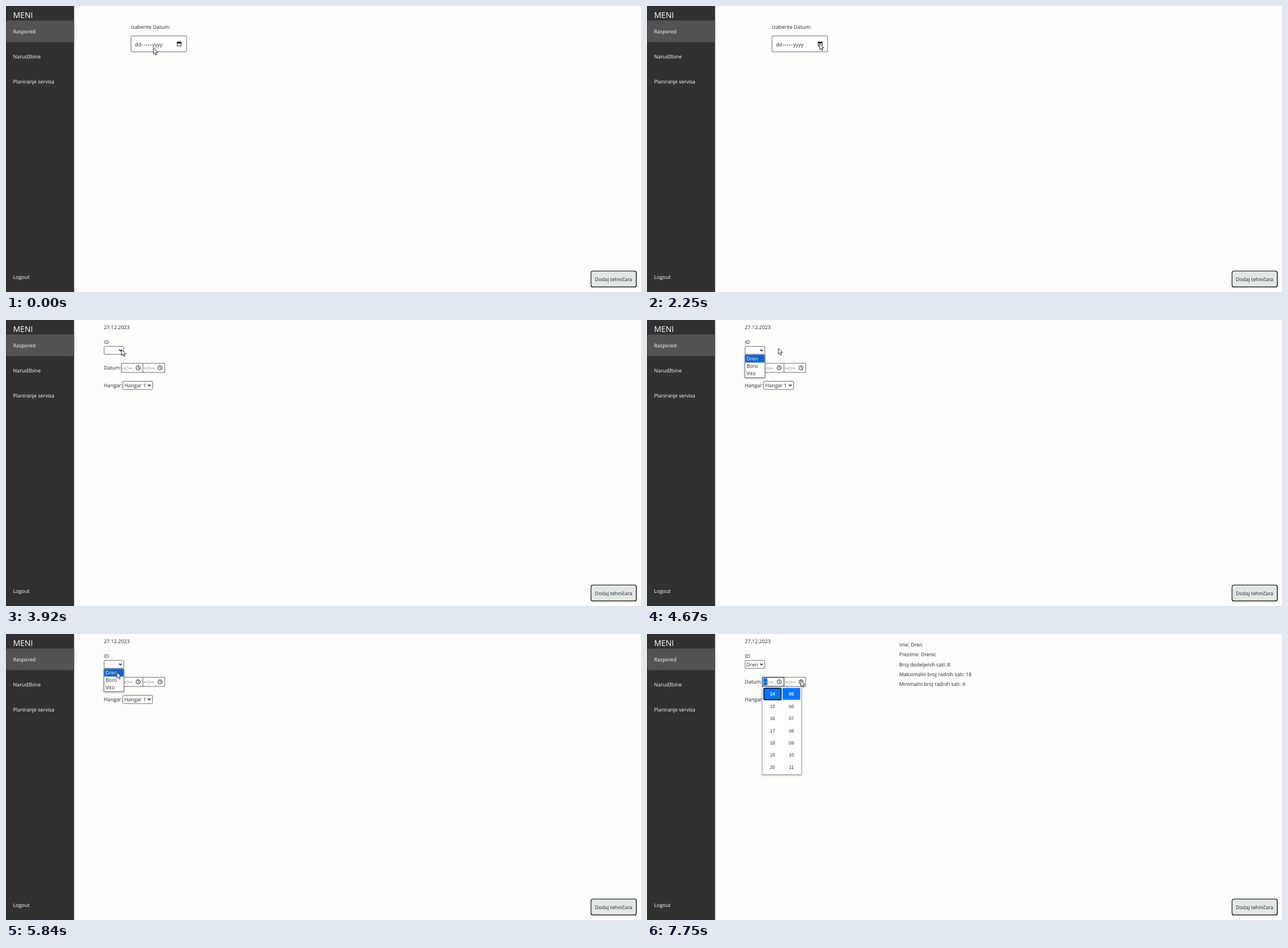
An HTML page for the animation above (8 s loop, 1115 by 502 pixels).

```html
<!DOCTYPE html>
<html lang="sr">
<head>
<meta charset="utf-8">
<title>Raspored</title>
<style>
html, body { margin: 0; width: 100%; height: 100%; overflow: hidden; background: #fdfdfc; }
svg { display: block; width: 1115px; height: 502px; }
text { font: 8.9px "Open Sans", "Noto Sans", sans-serif; fill: #262626; text-rendering: geometricPrecision; white-space: pre; }
.nav text { fill: #fff; }
.nav .title { font-size: 14px; }
.dash { letter-spacing: .85px; font-weight: 600; }
.pop text { font: 7.2px "Liberation Sans", Arial, sans-serif; fill: #111; }
.pop .mid { text-anchor: middle; }
.pop .bold { font-weight: bold; }
.pop .dim { fill: #767676; }
.pop .link { fill: #0f6fae; }
.pop .time { font-size: 8.3px; fill: #333; }
.pop .field { font: 8.9px "Open Sans", "Noto Sans", sans-serif; }
.pop .on, .on { fill: #fff; }
.box { fill: #fff; stroke: #6c6c6c; }
.panel { fill: #fff; stroke: #b4b4bc; filter: drop-shadow(0 1px 1.5px #0006); }
.blue { fill: #0075ff; }
.ring { stroke: #000; stroke-width: 1.5; }
.mark { fill: #0078d7; }
.line { fill: none; stroke: #222; }

/* every part shares one 8 s clock */
.a { animation: 8s step-end infinite; }
#day { animation-name: day; }
#cal { animation-name: cal; }
#form { animation-name: form; }
#list { animation-name: list; }
#info { animation-name: info; }
#focus { animation-name: focus; }
#clock { animation-name: clock; }
@keyframes day { 0% { visibility: visible } 45%, 100% { visibility: hidden } }
@keyframes cal { 0% { visibility: hidden } 28.75% { visibility: visible } 45%, 100% { visibility: hidden } }
@keyframes form { 0% { visibility: hidden } 45%, 100% { visibility: visible } }
@keyframes list { 0% { visibility: hidden } 50.5% { visibility: visible } 74.375%, 100% { visibility: hidden } }
@keyframes info { 0% { visibility: hidden } 74.375%, 100% { visibility: visible } }
@keyframes focus { 0% { visibility: hidden } 74.375% { visibility: visible } 88.125%, 100% { visibility: hidden } }
@keyframes clock { 0% { visibility: hidden } 88.125%, 100% { visibility: visible } }

#cursor { animation: move 8s ease-in-out infinite; }
@keyframes move {
  0%, 3.125% { transform: translate(259px, 74px) }
  12.5%, 13.625% { transform: translate(285px, 150px) }
  18.75%, 19.25% { transform: translate(272px, 181px) }
  19.875%, 22.375% { transform: translate(272px, 184px) }
  25%, 37.5% { transform: translate(303px, 66px) }
  40.625%, 41.75% { transform: translate(200px, 81px) }
  44.5%, 45% { transform: translate(267px, 199px) }
  48.5%, 56.25% { transform: translate(203px, 52px) }
  66.125%, 66.75% { transform: translate(489.5px, 26.5px) }
  73.75%, 77.125% { transform: translate(188px, 68px) }
  80.625%, 90.625% { transform: translate(232px, 83px) }
  96.5%, 100% { transform: translate(270px, 81.5px) }
}
</style>
</head>
<body>
<svg viewBox="0 0 1115 502">
  <defs>
    <path id="chev" class="line" d="M-2.3-1.2 0 1.2 2.3-1.2" stroke-width="1.5"/>
    <g id="dial" class="line"><circle r="3.7"/><path d="M0-2.4V.2L1.8 1.4"/></g>
  </defs>
  <rect width="1115" height="502" fill="#fdfdfc"/>

  <g class="nav">
    <rect width="119.6" height="502" fill="#313131"/>
    <rect x=".5" y="25.5" width="119.1" height="38" rx="3" fill="#535353"/>
    <text class="title" x="12.4" y="21">MENI</text>
    <text x="12.5" y="48">Raspored</text>
    <text x="12.5" y="92">Narudžbine</text>
    <text x="12.5" y="136">Planiranje servisa</text>
    <text x="12.5" y="479.3">Logout</text>
  </g>

  <rect x="1027.4" y="465.4" width="79.3" height="27.8" rx="3" fill="#e1e8e3" stroke="#000" stroke-width="1.3"/>
  <path class="line" d="M1027.4 490V468.4Q1027.4 465.4 1030.4 465.4H1104" style="stroke:#4c4c4c" stroke-width="1.3"/>
  <text x="1034" y="483">Dodaj tehničara</text>

  <g id="day" class="a">
    <text x="219.5" y="40">Izaberite Datum:</text>
    <rect class="box" x="219.5" y="52.5" width="97.5" height="28" rx="1"/>
    <text x="226.5" y="70.5">dd</text>
    <text class="dash" x="238" y="70.5">-----</text>
    <text x="256.8" y="70.5">yyyy</text>
    <path class="line" d="M300.6 63.6H307.6V70.2H300.6Z"/>
    <path d="M300.1 63H308.1V65.4H300.1ZM301.4 62H302.6V63H301.4ZM305.6 62H306.8V63H305.6Z"/>
  </g>

  <g id="cal" class="a pop">
    <rect class="line" x="219.5" y="52.5" width="97.5" height="28" rx="1"/>
    <rect class="mark" x="226.4" y="60.3" width="11.2" height="13"/>
    <text class="field on" x="226.5" y="70.5">dd</text>
    <rect class="panel" x="219.8" y="81.5" width="129.2" height="166.5"/>
    <text class="bold" x="226" y="97.2">December 2023</text>
    <path d="M280.6 93.6H285.2L282.9 96.2Z"/>
    <path class="line" d="M315.3 100V91M311.3 95 315.3 91 319.3 95M334.4 91V100M330.4 96 334.4 100 338.4 96" stroke-width=".9"/>
    <rect class="blue ring" x="260.2" y="192.2" width="15.4" height="15.6"/>
    <text class="link" x="233" y="238">Clear</text>
    <text class="link" x="336.3" y="238" text-anchor="end">Today</text>
  </g>

  <g id="form" class="a">
    <text x="171.8" y="16">27.12.2023</text>
    <text x="171.8" y="42.3">ID</text>
    <rect class="box" x="172.2" y="46.3" width="34.6" height="14" rx="1.5"/>
    <use href="#chev" x="201" y="53.3"/>
    <text x="171.8" y="86.5">Datum:</text>
    <rect class="box" x="202.5" y="76" width="38" height="16"/>
    <rect class="box" x="240.5" y="76" width="38.2" height="16"/>
    <text class="dash" x="204" y="87.2">--:--</text>
    <text class="dash" x="242.3" y="87.2">--:--</text>
    <use href="#dial" x="232" y="84"/>
    <use href="#dial" x="270.5" y="84"/>
    <text x="171.8" y="118.3">Hangar:</text>
    <rect class="box" x="205" y="107.5" width="52.3" height="14.5" rx="1.5"/>
    <text x="207.8" y="118.3">Hangar 1</text>
    <use href="#chev" x="251.6" y="114.5"/>
  </g>

  <g id="list" class="a">
    <rect class="panel" x="172" y="61" width="35" height="40" style="stroke:#777"/>
    <rect x="172.4" y="61.4" width="34.2" height="13.2" fill="#1163cc"/>
    <text class="on" x="174.8" y="71.3">Dren</text>
    <text x="174.8" y="84.3">Boro</text>
    <text x="174.8" y="97.3">Vito</text>
  </g>

  <g id="info" class="a">
    <text x="174.5" y="56.8">Dren</text>
    <text x="442.8" y="22">Ime: Dren</text>
    <text x="442.8" y="39.3">Prezime: Drenic</text>
    <text x="442.8" y="56.6">Broj dodeljenih sati: 8</text>
    <text x="442.8" y="73.8">Maksimalni broj radnih sati: 18</text>
    <text x="442.8" y="91">Minimalni broj radnih sati: 4</text>
  </g>
  <rect id="focus" class="a ring" x="172" y="46.1" width="35" height="14.4" rx="2" fill="none"/>

  <g id="clock" class="a pop">
    <rect class="line" x="202.5" y="76" width="38" height="16"/>
    <rect class="mark" x="204" y="77.6" width="7.4" height="12.6"/>
    <text class="field dash on" x="204" y="87.2">--</text>
    <rect class="panel" x="202.8" y="92.8" width="68.2" height="153.7"/>
    <rect class="blue ring" x="205.3" y="95.2" width="30.2" height="20.2" rx="1"/>
    <rect class="blue" x="238" y="94.8" width="31" height="20.8" rx="1"/>
  </g>

  <path id="cursor" d="M0 0V10.4L2.4 8.2 4.1 12 5.8 11.2 4.2 7.6H7.5Z" fill="#fff" stroke="#111" stroke-width=".9" stroke-linejoin="round"/>
</svg>
<script>
const byId = id => document.getElementById(id);

function label(group, str, x, y, cls = '') {
  const t = document.createElementNS('http://www.w3.org/2000/svg', 'text');
  t.setAttribute('x', x);
  t.setAttribute('y', y);
  t.setAttribute('class', 'mid ' + cls);
  t.textContent = str;
  group.append(t);
}

const cal = byId('cal');
const pitch = 16.67;
const colX = i => 234.5 + pitch * i;
['Mo', 'Tu', 'We', 'Th', 'Fr', 'Sa', 'Su'].forEach((d, i) => label(cal, d, colX(i), 119));
for (let i = 0; i < 42; i++) {
  const date = new Date(2023, 10, 27 + i);
  const inMonth = date.getMonth() === 11;
  const today = inMonth && date.getDate() === 27;
  label(cal, date.getDate(), colX(i % 7), 136.1 + pitch * Math.floor(i / 7),
    today ? 'bold on' : inMonth ? '' : 'dim');
}

const clock = byId('clock');
for (let i = 0; i < 7; i++) {
  const y = 108.3 + 21.4 * i;
  const cls = 'time' + (i ? '' : ' bold on');
  [[14, 220.3], [5, 253.5]].forEach(([from, x]) =>
    label(clock, String(from + i).padStart(2, '0'), x, y, cls));
}
</script>
</body>
</html>
```
